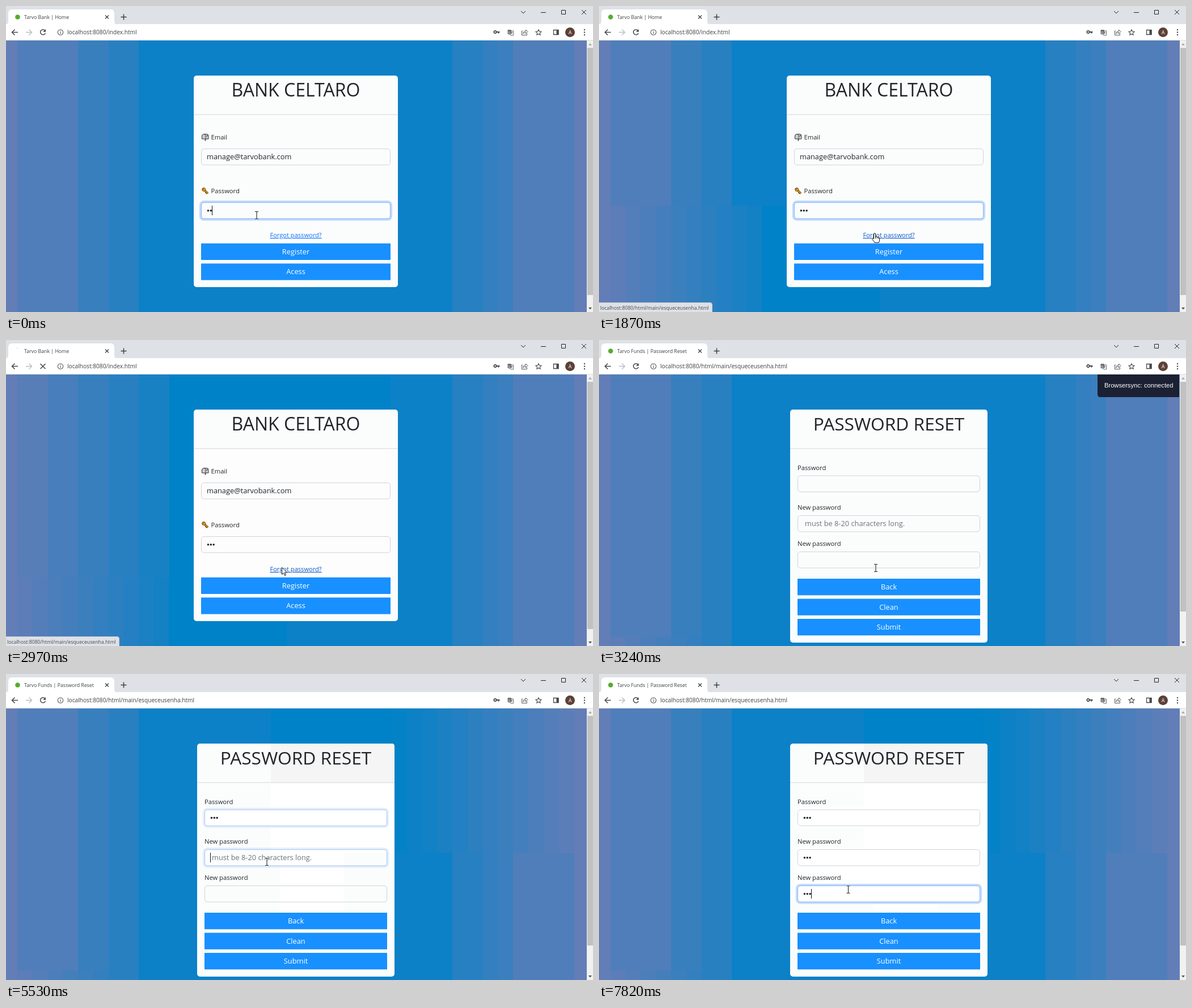
An HTML page for the animation above (8000 ms loop, 1035x541 px).

```html
<!DOCTYPE html>
<html lang="en">
<head>
<meta charset="utf-8">
<title>Password reset flow</title>
<style>
  html, body { margin: 0; width: 100%; height: 100%; overflow: hidden; background: #fff; }
  svg { display: block; width: 100%; height: 100%; font-family: "Open Sans", "Noto Sans", sans-serif; }
  text { white-space: pre; }
</style>
</head>
<body>
<svg id="stage" viewBox="0 0 1035 541"></svg>
<script>
const LOOP = 8000;
const INK = '#212529';
const stage = document.getElementById('stage');

const rect = (x, y, w, h, fill, extra = '') =>
  `<rect x="${x}" y="${y}" width="${w}" height="${h}" fill="${fill}" ${extra}/>`;
const circle = (x, y, r, fill, extra = '') =>
  `<circle cx="${x}" cy="${y}" r="${r}" fill="${fill}" ${extra}/>`;
const line = (d, stroke = '#45484c', width = 1.3, fill = 'none') =>
  `<path d="${d}" fill="${fill}" stroke="${stroke}" stroke-width="${width}"/>`;
const text = (x, y, s, size, fill = INK, extra = '') =>
  `<text x="${x}" y="${y}" font-size="${size}" fill="${fill}" ${extra}>${s}</text>`;
const centered = (y, s, size, fill, extra = '') =>
  text(511, y, s, size, fill, `text-anchor="middle" ${extra}`);

// ---- page background: a mirrored two-colour ramp shown in bands ----
function ramp(x) {
  const k = Math.max(0, 1 - Math.min(x, 1023 - x) / 341);
  return `rgb(${Math.round(102 * k)},${Math.round(130 - 5 * k)},${Math.round(200 - 18 * k)})`;
}

function bands(edges, y, h, flat) {
  return edges.slice(1).map((end, i) => {
    const x = edges[i], mid = (x + end) / 2;
    return rect(x, y, end - x, h, end - x > 180 ? flat : ramp(mid), 'shape-rendering="crispEdges"');
  }).join('');
}

const steps = (from, size, count) =>
  Array.from({ length: count }, (_, i) => Math.round(from + i * size));

const COARSE = [0, 20, 127, 181, 234, 787, 841, 867, 894, 1002, 1024];
const FINE_LEFT = [0, ...steps(20, 26.7, 11)];
const FINE_RIGHT = [...steps(680, 26.8, 13), 1024];
const MEDIUM_LEFT = [0, ...steps(20, 53.5, 6)];
const DEEP = '#0082c8';

function background(t, login) {
  let out = bands(COARSE, 61, 480, '#0c81c7');
  if (login && t >= 1420) out += bands([...FINE_LEFT, 495], 353, 188, DEEP);
  if (login && t >= 2820) out += bands([...MEDIUM_LEFT, 678], 61, 359, DEEP);
  if (!login && t >= 3240) out += bands(FINE_LEFT.slice(0, 8), 524, 17, DEEP);
  if (!login && t >= 5330) out += bands([467, ...FINE_RIGHT], 61, 255, DEEP);
  return out;
}

// ---- browser frame ----
function chrome(loading, login) {
  const title = login ? 'Tarvo Bank | Home' : 'Tarvo Funds | Password Reset';
  const url = login ? 'index.html' : 'html/main/esqueceusenha.html';
  const thumbEnd = login ? 511 : 480;
  return rect(0, 0, 1035, 33, '#dee1e6') + rect(0, 32, 1035, 29, '#fff') +
    '<path d="M-2 33Q4 33 4 27V13Q4 6 11 6H184Q191 6 191 13V27Q191 33 197 33Z" fill="#fff"/>' +
    rect(0, 60, 1035, 1, '#dcdfe2') +
    (loading ? line('M18.5 15L20 14.5', '#aeb3b8', .8) : circle(20.5, 19.5, 4.3, '#55ad2f')) +
    text(32, 23, title, 8.75, '#3c4043') +
    line('M175 16.5l6 6m0-6l-6 6', '#3c4043', 1.3) +
    line('M202.500 19.500h10m-5-5v10', '#3c4043', 1.5) +
    line('M908 9l4 4 4-4', '#222', 1) + line('M943 11.500h9', '#222', 1) +
    line('M979.500 7.500h7v7h-7z', '#222', 1) + line('M1015 7l8 8m0-8l-8 8', '#222', 1) +
    line('M21 46.500H11m4.500-5l-5 5 5 5', '#45484c', 1.5) +
    line('M35 46.500h10m-4.500-5l5 5-5 5', '#b9bcc0', 1.4) +
    (loading ? line('M60.500 42l9 9m0-9l-9 9', '#45484c', 1.5)
      : line('M68.700 43.200A4.600 4.600 0 1 0 69.500 48', '#45484c', 1.5) +
        '<path d="M70 41v4.800h-4.800z" fill="#45484c"/>') +
    circle(96, 46.500, 4.700, 'none', 'stroke="#55585c" stroke-width="1.1"') +
    line('M96 45.800v3.400M96 43.300v1.300', '#55585c', 1.2) +
    text(108, 50, `localhost:8080/${url}`, 10.16, '#3c4043') +
    circle(862.500, 46, 2.200, 'none', 'stroke="#45484c" stroke-width="1.7"') +
    line('M865 46h5.500m-2 0v2.500', '#45484c', 1.8) +
    rect(884.500, 42, 6.500, 8, '#6b6e72', 'rx="1"') +
    line('M889 44h5.500v8h-4.500l-2-2', '#6b6e72', 1) +
    text(885.300, 48.700, 'G', 6, '#fff') + line('M890.500 46.500h3m-1.500-1v1q0 2-2 3m1-2l2 2', '#6b6e72', .8) +
    line('M911 44h-1.500v7.500h9v-3M911.500 49q.5-4.500 5-4.500V42l3.500 3.500-3.500 3.500v-2.300q-3 0-5 2.300z', '#55585c', 1) +
    line('M939 41.700l1.500 3.200 3.500.4-2.600 2.400.7 3.500-3.100-1.800-3.100 1.800.7-3.500-2.600-2.400 3.500-.4z', '#45484c', 1.1) +
    line('M965.500 42.500h8.500v8h-8.500z', '#45484c', 1.3) + rect(970.500, 42, 4, 9, '#45484c') +
    circle(994.500, 46.500, 8.500, '#5d4037') +
    text(994.500, 49.800, 'A', 9, '#fff', 'text-anchor="middle"') +
    [42, 46.500, 51].map(y => circle(1020, y, 1.200, '#45484c')).join('') +
    rect(1024, 61, 11, 480, '#f1f1f1') + rect(1025, 74, 10, thumbEnd - 74, '#c1c1c1') +
    '<path d="M1027 69.500l3-3.500 3 3.500z" fill="#a3a3a3"/><path d="M1027 533l3 3.500 3-3.500z" fill="#505050"/>';
}

// ---- form parts ----
const label = (x, y, s) => text(x, y, s, 11.2);

const button = (x, y, w, s) =>
  rect(x, y, w, 29.300, '#1890ff') + centered(y + 19, s, 12.8, '#fff', 'font-weight="500"');

function field(x, y, w, { ring = 0, dots = 0, caret = false } = {}) {
  const box = (grow, stroke, width, opacity) =>
    rect(x + .5 - grow, y + .5 - grow, w - 1 + 2 * grow, 28.500 + 2 * grow, 'none',
      `rx="${4.500 + grow}" stroke="${stroke}" stroke-width="${width}" opacity="${opacity}"`);
  let out = box(0, '#ced4da', 1, 1);
  if (ring) out += box(2, '#0d6efd', 3.2, .25 * ring) + box(0, '#86b7fe', 1, ring);
  for (let i = 0; i < dots; i++) out += circle(x + 12.400 + i * 4.850, y + 14.700, 1.750, INK);
  if (caret) out += rect(Math.round(x + 9.700 + dots * 4.850), y + 6, 1, 17, '#111');
  return out;
}

const card = (x, w, h) => rect(x, 123, w, h, '#fbfdfd', 'rx="5"');
const rule = (x, w) => rect(x, 191.500, w, 1, '#d3d7d9');

const mailbox =
  '<path d="M345.500 235v-5q0-3.500 3.500-3.500h5q3 0 3 3.500v5z" fill="#c9cdd2" stroke="#333" stroke-width="1"/>' +
  line('M349 226.500q3 0 3 3.500v5', '#333', .8) + rect(350.500, 235, 2, 3.500, '#555') +
  line('M354 231v-2h2', '#333', 1);

const key =
  line('M349.500 325l6.500 6.500m-2.500-2l-1.500 1.500', '#5b3b0b', 3.2) +
  line('M349.500 325l6.500 6.500', '#f2a51d', 1.7) +
  circle(348.700, 324.500, 3, '#f2a51d', 'stroke="#5b3b0b" stroke-width="1"') +
  circle(347.800, 323.700, .9, '#5b3b0b');

const typed = (t, times) => times.filter(at => t >= at).length;

// Focus ring strength: half way for one step, then settled.
function ringAt(t, on, off) {
  const rise = t < on ? 0 : t < on + 150 ? .45 : 1;
  const fall = t < off ? 1 : t < off + 150 ? .45 : 0;
  return Math.min(rise, fall);
}

function loginPage(t) {
  const hover = t >= 880;
  return card(331, 360, 374) +
    (t >= 2820 ? rect(331, 193, 347, 227, '#fdfdfd') : '') + rule(331, 360) +
    centered(160, 'BANK CELTARO', 32) +
    mailbox + label(361.500, 235.500, 'Email') + field(344, 252, 334) +
    text(354, 271.200, 'manage@tarvobank.com', 12.8) +
    key + label(361.500, 331, 'Password') +
    field(344, 347, 334, {
      ring: ringAt(t, -200, 2270),
      dots: 2 + typed(t, [290]),
      caret: t < 880 || (t >= 1420 && t < 1870)
    }) +
    centered(409, 'Forgot password?', 11.1, hover ? '#0a58ca' : '#0d6efd', 'text-decoration="underline"') +
    button(344, 419.700, 334, 'Register') + button(344, 455.300, 334, 'Acess');
}

function resetPage(t) {
  const second = typed(t, [5930, 6080, 6370]);
  let out = card(337, 348, 412);
  if (t >= 3500) out += rect(483, 310, 113, 108, '#fff');
  if (t >= 4040) out += rect(346, 236, 329, 36, '#fff');
  if (t >= 5330) {
    out += '<path d="M467 123H680Q685 123 685 128V192H467Z" fill="#f5f5f6"/>' +
      rect(467, 193, 218, 123, '#fff');
  }
  if (t >= 6950) out += rect(346, 307, 329, 100, '#fff');
  out += rule(337, 348) + centered(160, 'PASSWORD RESET', 31.7) +
    label(350, 229.500, 'Password') +
    field(350, 239.500, 322, {
      ring: ringAt(t, 4040, 5530),
      dots: typed(t, [4330, 4610, 4890]),
      caret: t >= 4210 && t < 5400
    }) +
    label(350, 300, 'New password') +
    field(350, 310, 322, { ring: ringAt(t, 5530, 6950), dots: second, caret: t >= 5530 && t < 6900 }) +
    (second ? '' : text(363, 329, 'must be 8-20 characters long.', 12.8, '#6c757d')) +
    label(350, 364, 'New password') +
    field(350, 374, 322, { ring: ringAt(t, 6950, LOOP), dots: typed(t, [7380, 7530, 7820]), caret: t >= 7100 }) +
    ['Back', 'Clean', 'Submit'].map((s, i) => button(350, 422 + i * 35.500, 322, s)).join('');
  if (t < 5330) {
    out += '<path d="M879 61H1023V101H884Q879 101 879 96Z" fill="#1b2032"/>' +
      text(891, 84, 'Browsersync: connected', 11.15, '#fff', 'font-family="Liberation Sans, Arial, sans-serif"');
  }
  return out;
}

const statusBar = opacity => `<g opacity="${opacity}">` +
  '<path d="M-1 524.500H196Q199.500 524.500 199.500 528V542H-1Z" fill="#dee1e6" stroke="#c3c7cc"/>' +
  text(2, 537, 'localhost:8080/html/main/esqueceusenha.html', 8.7, '#45484c') + '</g>';

// ---- mouse pointer ----
const POINTERS = {
  beam: line('M-3 -6.500h2.200l.8.800.8-.800H3M-3 6.500h2.200l.8-.800.8.800H3M0 -6V6', '#fff', 2.2) +
    line('M-3 -6.500h2.200l.8.800.8-.800H3M-3 6.500h2.200l.8-.800.8.800H3M0 -6V6', '#222', 1.1),
  arrow: line('M0 0V12.500L3 9.800 5 14.500 7 13.600 5 9H9Z', '#111', 1, '#fff'),
  hand: line('M-1.500 10V1Q-1.500 -.3 0 -.3T1.500 1V5.500Q3.700 4.700 4.200 6.200 6.200 5.500 6.700 7 8.500 6.800 8.500 8.500V12Q8.500 14 7.500 16.300H0Q-1 14-4 10.800-5 9.200-3.800 8.500-2.800 8.200-1.500 10ZM1.500 5.500V9M4.200 6.500V9M6.700 7.300V9.500', '#111', 1, '#fff')
};

const MOVES = [
  [0, 442, 370, 'beam'], [600, 456, 382, 'arrow'], [740, 472, 393, 'arrow'],
  [880, 482, 401, 'hand'], [1020, 486, 402, 'hand'], [2820, 486.500, 402, 'arrow'],
  [3240, 488, 403, 'beam'], [3380, 487, 390, 'beam'], [3500, 486, 360, 'beam'],
  [3640, 484, 316, 'beam'], [3770, 483, 277, 'arrow'], [3890, 483, 264, 'beam'],
  [5040, 481, 272, 'arrow'], [5180, 476, 290, 'arrow'], [5330, 471, 309, 'beam'],
  [5530, 460, 332, 'beam'], [6500, 452, 346, 'arrow'], [6650, 446, 361, 'beam'],
  [6800, 441, 376, 'beam'], [6950, 439.500, 381, 'beam']
];

function pointer(t) {
  const [, x, y, kind] = MOVES.filter(([at]) => t >= at).pop();
  return `<g transform="translate(${x} ${y})">${POINTERS[kind]}</g>`;
}

let shown = '';
function draw(t) {
  const login = t < 3110;
  const markup = background(t, login) + (login ? loginPage(t) : resetPage(t)) +
    chrome(t >= 2820 && t < 3110, login) +
    (t >= 1300 && t < 3240 ? statusBar(t < 1420 ? .5 : 1) : '') + pointer(t);
  if (markup !== shown) stage.innerHTML = shown = markup;
}

function tick() {
  draw(performance.now() % LOOP);
  requestAnimationFrame(tick);
}
tick();
</script>
</body>
</html>
```
